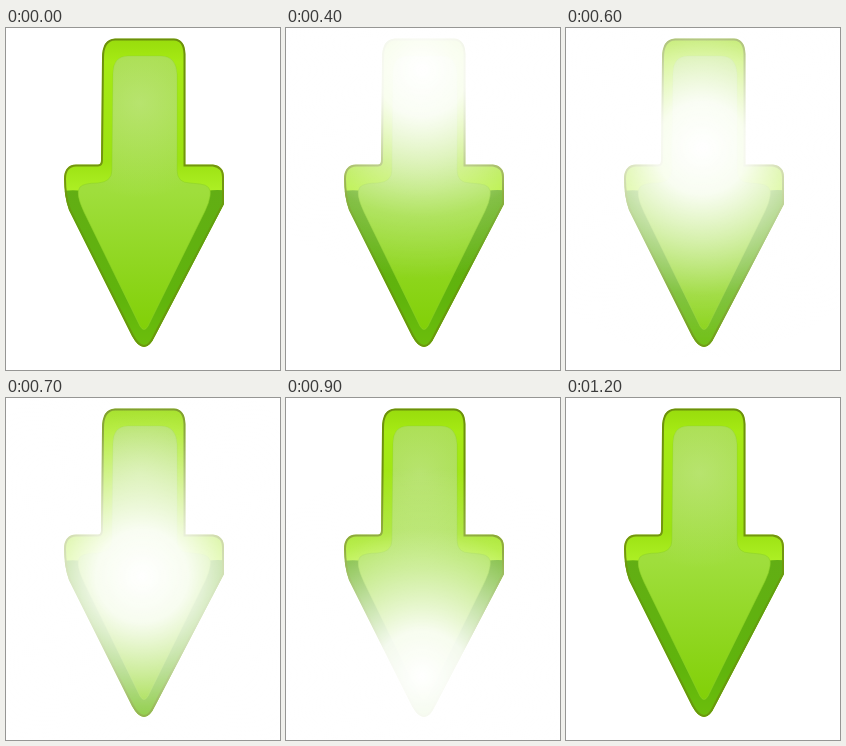
Animation of 274x342 px, one loop 1.3 s. Source, as an HTML page:

```html
<!DOCTYPE html>
<html lang="en">
<head>
<meta charset="utf-8">
<title>Down arrow</title>
<style>
html, body { margin: 0; width: 100%; height: 100%; overflow: hidden; background: #fff; }
svg { display: block; width: 274px; height: 342px; }
#glow { animation: sweep 1300ms step-end infinite; }

/* One position every 100 ms */
@keyframes sweep {
  0% { transform: translateY(-240px); }
  7.692% { transform: translateY(-100px); }
  15.385% { transform: translateY(-45px); }
  23.077% { transform: translateY(3px); }
  30.769% { transform: translateY(42px); }
  38.462% { transform: translateY(80px); }
  46.154% { transform: translateY(120px); }
  53.846% { transform: translateY(178px); }
  61.538% { transform: translateY(228px); }
  69.231% { transform: translateY(278px); }
  76.923% { transform: translateY(340px); }
  84.615% { transform: translateY(420px); }
  92.308%, 100% { transform: translateY(560px); }
}
</style>
</head>
<body>
<svg viewBox="0 0 274 342">
  <defs>
    <path id="arrow" d="M96 30Q96 11 109 10.5H168Q179 11 179.5 26V136.5H207Q218 138 218 149V176L149 308Q144 319 138 319Q132 319 126 308L63 182Q58 168 58 151Q58 137 70 136.5H92Q95 136.5 95 132Z"/>
    <path id="face" d="M107 46Q107 28 122 28H155Q170 28 171 46V142Q171 155 184 155L194 156Q206 157 204 168Q203 175 199 183L142 298Q138 305 134 298L78 184Q69 165 74 159Q78 155 92 155Q106 154 106 142Z"/>
    <clipPath id="inside"><use href="#arrow"/></clipPath>
    <linearGradient id="edge" gradientUnits="userSpaceOnUse" x1="0" y1="11" x2="0" y2="318">
      <stop offset="0" stop-color="#6c8f0c"/>
      <stop offset=".45" stop-color="#74960e"/>
      <stop offset=".6" stop-color="#62a00e"/>
      <stop offset="1" stop-color="#6a980c"/>
    </linearGradient>
    <linearGradient id="rim" gradientUnits="userSpaceOnUse" x1="0" y1="11" x2="0" y2="165">
      <stop offset="0" stop-color="#98dc0c"/>
      <stop offset=".15" stop-color="#a6ea14"/>
      <stop offset=".8" stop-color="#9ce212"/>
      <stop offset="1" stop-color="#aef026"/>
    </linearGradient>
    <linearGradient id="side" gradientUnits="userSpaceOnUse" x1="0" y1="160" x2="0" y2="318">
      <stop offset="0" stop-color="#62ae14"/>
      <stop offset=".7" stop-color="#60b40c"/>
      <stop offset="1" stop-color="#6cbe0c"/>
    </linearGradient>
    <linearGradient id="panel" gradientUnits="userSpaceOnUse" x1="0" y1="28" x2="0" y2="300">
      <stop offset="0" stop-color="#a2dc40"/>
      <stop offset=".5" stop-color="#9fde3c"/>
      <stop offset="1" stop-color="#82d008"/>
    </linearGradient>
    <radialGradient id="sheen" gradientUnits="userSpaceOnUse" cx="134" cy="75" r="95">
      <stop offset="0" stop-color="#c6e88e" stop-opacity=".6"/>
      <stop offset="1" stop-color="#c6e88e" stop-opacity="0"/>
    </radialGradient>
    <radialGradient id="light">
      <stop offset="0" stop-color="#fff"/>
      <stop offset=".22" stop-color="#fff" stop-opacity=".93"/>
      <stop offset=".45" stop-color="#fff" stop-opacity=".6"/>
      <stop offset=".7" stop-color="#fff" stop-opacity=".22"/>
      <stop offset="1" stop-color="#fff" stop-opacity="0"/>
    </radialGradient>
  </defs>

  <g clip-path="url(#inside)">
    <use href="#arrow" fill="url(#rim)"/>
    <path d="M50 164Q66 161 76 163L138 200L201 163Q210 161 225 163V325H50Z" fill="url(#side)"/>
    <use href="#arrow" fill="none" stroke="url(#edge)" stroke-width="4"/>
  </g>
  <use href="#face" fill="url(#panel)" stroke="#8ed228" stroke-opacity=".6"/>
  <use href="#face" fill="url(#sheen)"/>

  <circle id="glow" cx="136" cy="0" r="210" fill="url(#light)"/>
</svg>
</body>
</html>
```
